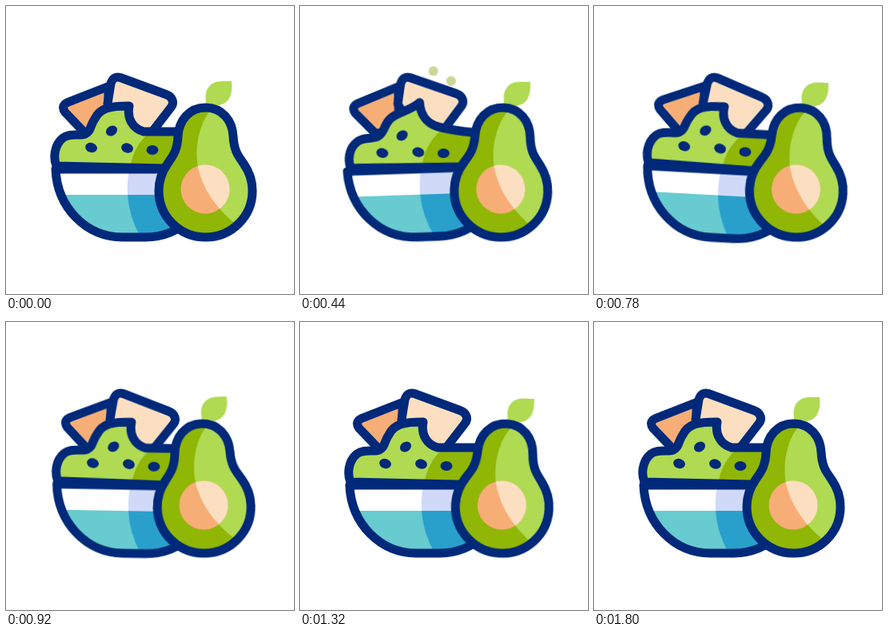
An HTML page for the animation above (1820 ms loop, 360 by 360 pixels).

```html
<!DOCTYPE html>
<html lang="en">
<head>
<meta charset="utf-8">
<title>Guacamole bowl and avocado</title>
<style>
  :root {
    --navy: #00297a;
    --lime: #b0da52;
    --green: #90b606;
    --orange: #f7ae76;
    --cream: #fcdfc0;
    --loop: 1820ms;
  }
  html, body { margin: 0; width: 100%; height: 100%; overflow: hidden; background: #fff; }
  svg { display: block; width: 100vw; height: 100vh; }

  .line { stroke: var(--navy); stroke-width: 11; stroke-linejoin: round; stroke-linecap: round; }
  .lime { fill: var(--lime); }
  .green { fill: var(--green); }
  .orange { fill: var(--orange); }
  .cream { fill: var(--cream); }
  .none { fill: none; }

  .bowl, .avocado, .chips, .guac, .seeds, .drop {
    animation: var(--loop) ease-in-out infinite;
  }
  .bowl { transform-origin: 142px 290px; animation-name: rock; }
  .avocado { transform-origin: 249.5px 290px; animation-name: sway; }
  .chips { transform-origin: 142px 190px; animation-name: tilt; }
  .guac { animation-name: splash; }
  .seeds { fill: var(--navy); animation-name: dip; }
  .drop { fill: var(--lime); opacity: 0; }
  .d1 { animation-name: drop1; }
  .d2 { animation-name: drop2; }

  @keyframes rock {
    0%, 55%, 100% { transform: rotate(0deg); }
    14% { transform: rotate(4.6deg); }
    30.8% { transform: rotate(-5deg); }
    43.7% { transform: rotate(3.2deg); }
  }
  @keyframes sway {
    0%, 16%, 100% { transform: rotate(0deg); }
    36.3% { transform: rotate(5deg); }
    58.2% { transform: rotate(-4.1deg); }
    73% { transform: rotate(3.2deg); }
  }
  @keyframes tilt {
    0%, 31%, 100% { transform: rotate(0deg); }
    13.6% { transform: rotate(2.6deg); }
  }
  /* The mound sinks and throws up a peak, then settles. */
  @keyframes splash {
    0%, 40%, 100% {
      d: path("M63 200 C59 190 60 174 71 165 C80 158 92 163 99 160 C107 156 105 149 111 141 C118 127 130 125 154 125 C151 140 158 153 172 157 C186 157 200 157 240 157 L240 204 Z");
    }
    13.6% {
      d: path("M68 200 C65 190 67 175 79 168 C88 162 96 167 104 162 C111 158 112 148 120 141 C130 134 147 136 156 119 C158 134 166 143 176 148 C188 155 205 160 240 166 L240 204 Z");
    }
  }
  @keyframes dip {
    0%, 43%, 100% { transform: translateY(0); }
    13.6% { transform: translateY(7.5px); }
  }
  @keyframes drop1 {
    0%, 7% { transform: translate(168px, 124px); opacity: 0; }
    13.2% { transform: translate(173px, 103px); opacity: .75; fill: #b0da52; animation-timing-function: ease-out; }
    31%, 33% { transform: translate(165px, 76px); opacity: 1; fill: #d0d3a0; }
    40%, 100% { transform: translate(165px, 77px); opacity: 0; fill: #d0d3a0; }
  }
  @keyframes drop2 {
    0%, 7% { transform: translate(174px, 128px); opacity: 0; }
    13.2% { transform: translate(184px, 113px); opacity: .75; fill: #b0da52; animation-timing-function: ease-out; }
    31%, 33% { transform: translate(190px, 89px); opacity: 1; fill: #d0d3a0; }
    40%, 100% { transform: translate(190px, 90px); opacity: 0; fill: #d0d3a0; }
  }
</style>
</head>
<body>
<svg viewBox="0 0 360 360">
  <defs>
    <path id="dish" d="M62 204 C64 252 100 289 146 289 H174 C220 289 256 252 258 204 Z"/>
    <path id="pear" d="M249.5 127 C229 127 216 143 215 163 C214 182 208 188 202 197 C195 207 191 217 191 231 C191 263 217 289 249.5 289 C282 289 308 263 308 231 C308 217 304 207 297 197 C291 188 285 182 284 163 C283 143 270 127 249.5 127 Z"/>
    <path id="shine" d="M260 126 C238 146 234 190 243 212 C250 234 264 253 286 272 L330 272 V126 Z"/>
    <circle id="pit" cx="249" cy="229" r="30.5"/>
    <clipPath id="inDish"><use href="#dish"/></clipPath>
    <clipPath id="inPear"><use href="#pear"/></clipPath>
    <clipPath id="inPit"><use href="#pit"/></clipPath>
    <clipPath id="inGuac"><path class="guac"/></clipPath>
  </defs>

  <g class="bowl">
    <g class="chips">
      <path class="line orange" d="M98 158 L74 133 C70 128 71 123 77 120.500 L128 100.500 V158 Z"/>
      <path class="line cream" d="M127 122 L131 97 Q134 87 143 89.500 L200 110.500 C208 113 211 121 206 127 L182 158 L150 165 Z"/>
    </g>

    <path class="guac lime"/>
    <path class="green" clip-path="url(#inGuac)" d="M182 155 C165 170 157 185 155 206 H250 V155 Z"/>
    <g class="seeds">
      <ellipse cx="132" cy="156" rx="7.5" ry="6" transform="rotate(-35 132 156)"/>
      <ellipse cx="106.500" cy="177" rx="7.5" ry="6" transform="rotate(15 106.500 177)"/>
      <ellipse cx="151.500" cy="177.500" rx="7.5" ry="6" transform="rotate(15 151.500 177.500)"/>
      <ellipse cx="183" cy="180" rx="7.5" ry="6"/>
    </g>
    <path class="guac line none"/>

    <g clip-path="url(#inDish)">
      <rect x="50" y="200" width="240" height="36" fill="#fff"/>
      <rect x="50" y="236" width="240" height="60" fill="#67cbd0"/>
      <path fill="#d0d9f8" d="M154 204 Q151 220 152 236 H290 V204 Z"/>
      <path fill="#29a0cb" d="M152 236 Q154 265 170 292 H290 V236 Z"/>
    </g>
    <use href="#dish" class="line none"/>
  </g>

  <circle class="drop d1" r="6"/>
  <circle class="drop d2" r="6"/>

  <g class="avocado">
    <path class="lime" d="M251 124 C246 106 254 94 270 94 H282 C284 113 277 125 262 124 Q256 123 251 124 Z"/>
    <use href="#pear" class="green"/>
    <use href="#shine" class="lime" clip-path="url(#inPear)"/>
    <use href="#pit" class="orange"/>
    <use href="#shine" class="cream" clip-path="url(#inPit)"/>
    <use href="#pear" class="line none"/>
  </g>
</svg>
</body>
</html>
```
